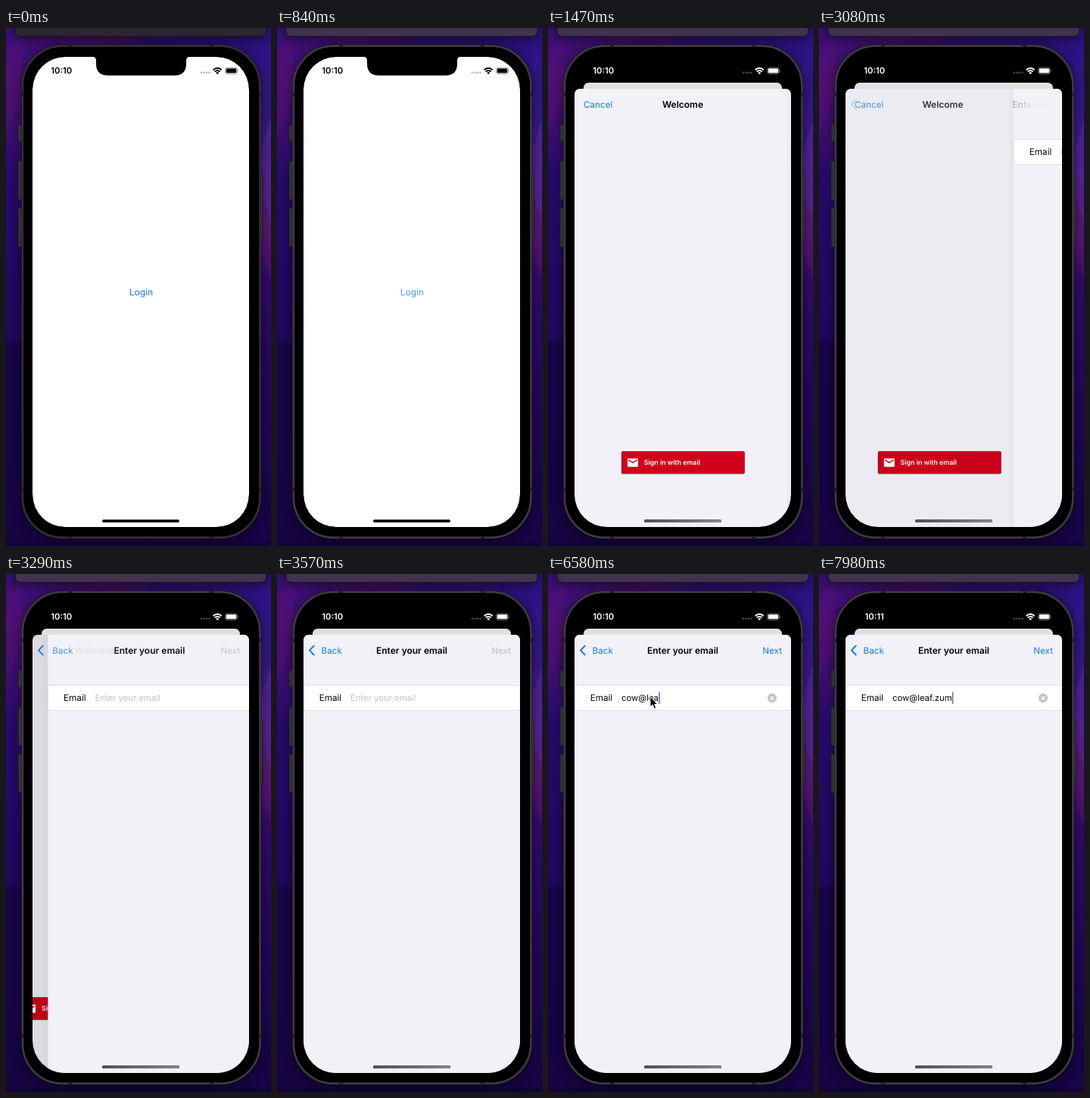
Write an HTML page that moves like this. It is 350 px wide and 682 px high and loops after 8 s.

```html
<!DOCTYPE html>
<html lang="en">
<head>
<meta charset="utf-8">
<title>Sign-in flow</title>
<style>
  html, body { margin: 0; width: 100%; height: 100%; overflow: hidden; background: #17053f; }
  svg { display: block; width: 350px; height: 682px; }
  text { font: 400 11.7px Inter, "Liberation Sans", sans-serif; text-rendering: geometricPrecision; }
  .bold { font-weight: 600; font-size: 12px; }
  .field { font-size: 11.3px; }
  .blue { fill: #147ce8; }
  .mid { text-anchor: middle; }
</style>
</head>
<body>
<svg viewBox="0 0 350 682">
  <defs>
    <linearGradient id="wallLeft" x2="0" y2="1">
      <stop offset="0" stop-color="#390f78"/><stop offset=".1" stop-color="#4a0f70"/>
      <stop offset=".22" stop-color="#380d6e"/><stop offset=".28" stop-color="#270a6a"/>
      <stop offset=".6" stop-color="#20075e"/><stop offset=".61" stop-color="#180449"/>
      <stop offset="1" stop-color="#180443"/>
    </linearGradient>
    <linearGradient id="wallRight" x2="0" y2="1">
      <stop offset="0" stop-color="#2d1282"/><stop offset=".16" stop-color="#35178a"/>
      <stop offset=".28" stop-color="#491c88"/><stop offset=".4" stop-color="#4c187a"/>
      <stop offset=".48" stop-color="#340a6e"/><stop offset=".7" stop-color="#250660"/>
      <stop offset="1" stop-color="#180445"/>
    </linearGradient>
    <linearGradient id="wallTop">
      <stop stop-color="#3f1078"/><stop offset=".4" stop-color="#430f66"/>
      <stop offset=".55" stop-color="#2c1070"/><stop offset="1" stop-color="#2d1282"/>
    </linearGradient>
    <linearGradient id="pill"><stop stop-color="#525254"/><stop offset="1" stop-color="#868688"/></linearGradient>
    <linearGradient id="titleFade" gradientUnits="userSpaceOnUse" x1="266" x2="284" y1="0" y2="0">
      <stop stop-color="#fff"/><stop offset="1" stop-color="#000"/>
    </linearGradient>
    <filter id="blur" x="-20%" y="-20%" width="140%" height="140%"><feGaussianBlur stdDeviation="8"/></filter>
    <mask id="titleMask" maskUnits="userSpaceOnUse" x="35" y="80" width="286" height="40">
      <rect x="35" y="80" width="286" height="40" fill="url(#titleFade)"/>
    </mask>
    <clipPath id="screenClip"><rect x="35" y="38" width="286" height="619" rx="43"/></clipPath>
    <clipPath id="sheetClip"><rect x="35" y="80" width="286" height="620" rx="7"/></clipPath>
  </defs>

  <!-- Desktop -->
  <rect width="175" height="682" fill="url(#wallLeft)"/>
  <rect x="175" width="175" height="682" fill="url(#wallRight)"/>
  <rect x="22" width="314" height="60" fill="url(#wallTop)"/>
  <path d="M0 25L22 12V90L0 140Z" fill="#5a127a" opacity=".35"/>
  <path d="M350 120L336 165V215L350 255Z" fill="#6a30b0" opacity=".35"/>
  <path d="M336 222L350 250V330L336 290Z" fill="#6a1668" opacity=".35"/>
  <rect y="677" width="350" height="5" fill="#12032f" opacity=".6"/>
  <g filter="url(#blur)" opacity=".55">
    <rect x="21" y="24" width="316" height="652" rx="54"/>
    <rect x="12" y="-20" width="332" height="34"/>
  </g>
  <rect id="toolbar" x="12" y="-20" width="332" height="31" rx="7" stroke="#19121f"/>

  <!-- Phone -->
  <g fill="#343238" stroke="#19171c" stroke-width=".7">
    <rect x="16" y="127" width="7" height="22" rx="1"/>
    <rect x="16" y="175" width="7" height="51" rx="1"/>
    <rect x="16" y="237" width="7" height="51" rx="1"/>
    <rect x="334" y="192" width="5" height="84" rx="1"/>
  </g>
  <rect x="20.300" y="22" width="316.700" height="650.500" rx="54" fill="#1b1a1d"/>
  <rect id="rim" x="22" y="23.700" width="313.300" height="647.100" rx="52.500" fill="#000" stroke-width="2.400"/>
  <path d="M82 24h5M269 24h5M82 671h5M269 671h5M22 85v5M22 605v5M336 85v5M336 605v5" stroke="#1d1c1f" stroke-width="3"/>

  <g clip-path="url(#screenClip)">
    <g id="card">
      <rect id="cardFill" width="286" height="619"/>
      <text id="login" class="mid blue" x="143.500" y="314" style="font-size:12px">Login</text>
    </g>

    <g id="sheet"><g clip-path="url(#sheetClip)">
      <rect x="35" y="80" width="286" height="620" fill="#f2f1f7"/>
      <g id="welcomePage">
        <rect x="96.500" y="558" width="163.500" height="30" rx="2" opacity=".18"/>
        <rect x="97.500" y="557.500" width="162" height="29" rx="1.500" fill="#d0021b" stroke="#c00a20" stroke-width=".8"/>
        <path d="M97.800 558v28" stroke="#98071a"/>
        <rect x="105" y="566.700" width="14" height="11" rx="1.300" fill="#fff"/>
        <path d="M106.200 568.700l5.800 3.700 5.800-3.700" fill="none" stroke="#d0021b" stroke-width="1.400"/>
        <text class="bold" x="126.800" y="575.200" fill="#fff" style="font-size:8.800px">Sign in with email</text>
      </g>
      <rect id="dim" x="35" y="80" width="286" height="620"/>

      <g id="emailPage">
        <rect x="29" y="80" width="6" height="620" opacity=".02"/>
        <rect x="35" y="80" width="286" height="620" fill="#f2f1f7"/>
        <rect x="35" y="146.500" width="286" height="33" fill="#fff" stroke="#dcdbe0" stroke-width=".8"/>
        <text x="55.700" y="167.300">Email</text>
        <text id="placeholder" class="field" x="97" y="167.300" fill="#c3c3c7">Enter your email</text>
        <text id="typed" class="field" x="97" y="167.300"></text>
        <rect id="caret" y="155.500" width="1.400" height="15.500" fill="#3568c8"/>
        <g id="clear">
          <circle cx="296" cy="163.300" r="6" fill="#c5c5c9"/>
          <path d="M293.800 161.100l4.400 4.400m0-4.400l-4.400 4.400" stroke="#fff" stroke-width="1.200"/>
        </g>
      </g>

      <text id="cancel" class="blue" x="47" y="104.800">Cancel</text>
      <text id="welcome" class="bold mid" x="178" y="104.800">Welcome</text>
      <path id="chevron" d="M48.700 94.500l-5.700 6 5.700 6" fill="none" stroke="#147ce8" stroke-width="1.900" stroke-linecap="round"/>
      <text id="back" class="blue" x="58.500" y="104.800">Back</text>
      <g mask="url(#titleMask)"><text id="title" class="bold mid" x="178" y="104.800">Enter your email</text></g>
      <text id="next" x="309" y="104.800" text-anchor="end">Next</text>
    </g></g>
  </g>

  <path d="M114 37.500Q119 38 119 43V47Q119 62.500 134.500 62.500H222.500Q238 62.500 238 47V43Q238 38 243 37.500Z"/>
  <g id="status">
    <text id="clock" class="bold mid" x="73.200" y="60.300" style="font-size:11.300px"></text>
    <g opacity=".28">
      <circle cx="258" cy="58.800" r="1.300"/><circle cx="261.500" cy="58.800" r="1.300"/>
      <circle cx="265" cy="58.800" r="1.300"/><circle cx="268.500" cy="58.800" r="1.300"/>
    </g>
    <path d="M273.700 55.300Q279.200 50 284.700 55.300M275.800 57.500Q279.200 54.300 282.600 57.500" fill="none" stroke="currentColor" stroke-width="1.900"/>
    <path d="M277.200 58.900Q279.200 57.300 281.200 58.900L279.200 61Z"/>
    <rect x="289.500" y="52" width="16" height="8.500" rx="2.500" fill="none" stroke="currentColor" stroke-width=".8" opacity=".45"/>
    <rect x="290.700" y="53.200" width="13.600" height="6.100" rx="1.400"/>
    <path d="M306.500 54.700q1.300 1.500 0 3z" opacity=".6"/>
  </g>
  <rect x="127" y="647.200" width="102" height="3.800" rx="1.900"/>
  <rect id="indicator" x="127" y="647.200" width="102" height="3.800" rx="1.900" fill="url(#pill)"/>
  <path id="pointer" d="M135 161.500V175L138.200 172.200 140.400 177.400 142.700 176.400 140.500 171.500H144.700Z" stroke="#fff" stroke-width=".9"/>
</svg>
<script>
const el = {};
document.querySelectorAll("svg [id]").forEach(node => el[node.id] = node);

const LOOP = 8000, STEP = 70;
const ADDRESS = "cow@leaf.zum";
const KEY_TIMES = [4690, 4900, 5180, 5810, 6090, 6300, 6580, 6790, 7070, 7210, 7280, 7490];

const mix = (a, b, k) => a + (b - a) * k;
const gray = v => `rgb(${v},${v},${v})`;
const blend = (a, b, k) => `rgb(${a.map((v, i) => mix(v, b[i], k))})`;
const fade = (node, k) => node.setAttribute("opacity", k);
const move = (node, x, y = 0) => node.setAttribute("transform", `translate(${x} ${y})`);

// Critically damped spring from 0 to 1, at rest once close enough
function spring(t, start) {
  const s = Math.max(0, t - start) * 0.0163;
  const value = 1 - (1 + s) * Math.exp(-s);
  return value > 0.998 ? 1 : value;
}

function draw(t) {
  const focus = Math.min(1, t / 350);
  el.toolbar.setAttribute("fill", blend([43, 38, 48], [65, 51, 77], focus));
  el.rim.setAttribute("stroke", blend([50, 48, 53], [62, 60, 65], focus));

  // Sheet rises while the first screen shrinks behind it
  const rise = spring(t, 900);
  el.card.setAttribute("transform",
    `translate(${35 + 12 * rise} ${38 + 34 * rise}) scale(${1 - 0.084 * rise})`);
  el.cardFill.setAttribute("rx", mix(43, 7, rise));
  el.cardFill.setAttribute("fill", gray(255 - 31 * rise));
  fade(el.login, t < 840 ? 1 : t < 910 ? 0.75 : Math.min(1, 0.5 + (t - 910) / 500));
  move(el.sheet, 0, 577 * (1 - rise));
  const ink = gray(255 * rise ** 4);
  el.status.setAttribute("fill", ink);
  el.status.style.color = ink;
  fade(el.indicator, rise);

  // Push from the welcome page to the email page
  const push = spring(t, 3025.5), rest = 1 - push;
  move(el.welcomePage, -86 * push);
  fade(el.dim, 0.1 * push);
  move(el.emailPage, 286 * rest);
  fade(el.cancel, rest);
  fade(el.welcome, rest);
  move(el.welcome, -65 * push);
  fade(el.chevron, push);
  fade(el.back, push ** 4);
  move(el.back, 40 * rest);
  fade(el.title, push);
  move(el.title, 160 * rest);
  fade(el.next, push ** 1.5);

  // Typing
  const count = KEY_TIMES.filter(time => t >= time).length;
  el.typed.textContent = ADDRESS.slice(0, count);
  el.caret.setAttribute("x", 97.3 + (count && el.typed.getComputedTextLength()));
  fade(el.caret, t >= 4130 ? 1 : 0);
  fade(el.placeholder, count ? 0 : 1);
  fade(el.clear, count ? 1 : 0);
  el.next.setAttribute("fill", count ? "#147ce8" : "#bfbfc4");

  fade(el.pointer, t < 4480 || t >= 7770 ? 0 : t < 7700 ? 1 : 0.4);
  el.clock.textContent = t < 7980 ? "10:10" : "10:11";
}

function frame() {
  draw(Math.floor(performance.now() % LOOP / STEP) * STEP);
  requestAnimationFrame(frame);
}
frame();
</script>
</body>
</html>
```
